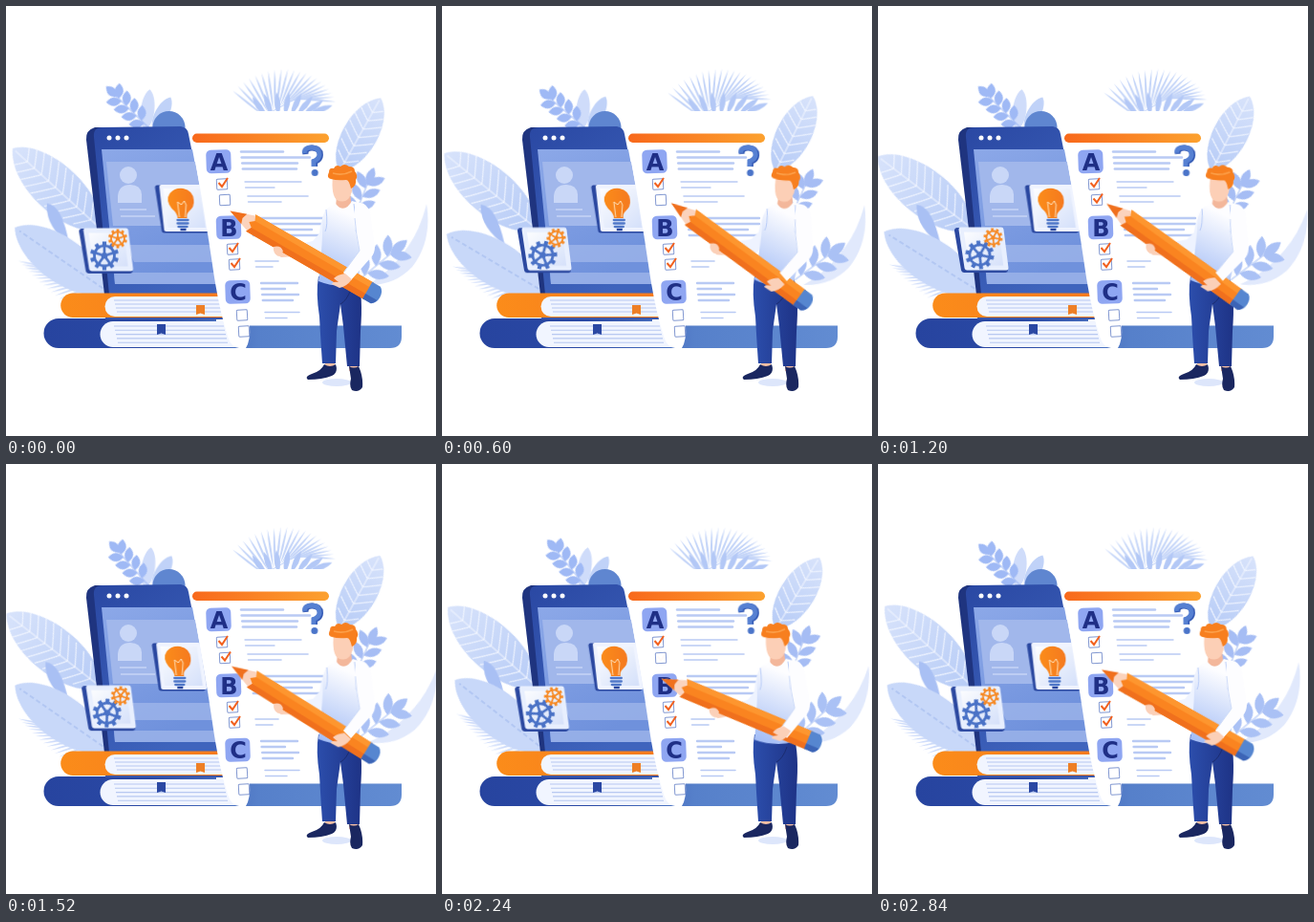
Write an HTML page that moves like this. It is 450x450 px and loops after 2.88 s.

```html
<!DOCTYPE html>
<html lang="en">
<head>
<meta charset="utf-8">
<title>Online test</title>
<style>
html, body { margin: 0; width: 100%; height: 100%; overflow: hidden; background: #fff; }
svg { display: block; width: 100vw; height: 100vh; }
text { font: bold 24px "DejaVu Sans", sans-serif; fill: #1f2f86; text-anchor: middle; }
.sway { animation: sway 1440ms ease-in-out infinite alternate; }
.float { animation: float 1440ms ease-in-out infinite alternate; }
.pencil { transform-origin: 312px 258px; animation: write 2880ms linear infinite; }
.torso { transform-origin: 350px 285px; animation: lean 2880ms linear infinite; }
.tick { animation: tick 2880ms linear infinite; }
.gear { animation: turn 2880ms linear infinite; }
@keyframes sway { from { transform: rotate(var(--a)); } to { transform: rotate(var(--b)); } }
@keyframes float { from { transform: translate(var(--a)); } to { transform: translate(var(--b)); } }
@keyframes turn { to { transform: rotate(72deg); } }
@keyframes write {
  0%, 100% { transform: rotate(0deg); }
  12.5% { transform: rotate(4deg); animation-timing-function: ease-out; }
  30% { transform: rotate(7.6deg); animation-timing-function: ease-in; }
  53% { transform: rotate(2deg); }
  67% { transform: rotate(-7.3deg); animation-timing-function: ease-out; }
  73% { transform: rotate(-7.8deg); animation-timing-function: ease-in; }
  87.5% { transform: rotate(-5deg); }
}
@keyframes lean {
  0%, 100% { transform: rotate(0deg); }
  12.5% { transform: rotate(3.3deg); animation-timing-function: ease-out; }
  30% { transform: rotate(4.6deg); animation-timing-function: ease-in; }
  53% { transform: rotate(.5deg); }
  67%, 87% { transform: rotate(-1.5deg); }
}
@keyframes tick {
  0%, 28% { opacity: 0; }
  33%, 72% { opacity: 1; }
  78%, 100% { opacity: 0; }
}
</style>
</head>
<body>
<svg viewBox="0 0 450 450">
  <defs>
    <linearGradient id="leaf"><stop stop-color="#b6cbf6"/><stop offset="1" stop-color="#d8e3fb"/></linearGradient>
    <linearGradient id="phone" x2=".6" y2="1"><stop stop-color="#2a48a3"/><stop offset="1" stop-color="#3f64bd"/></linearGradient>
    <linearGradient id="screen" x2=".4" y2="1"><stop stop-color="#8ca8e8"/><stop offset="1" stop-color="#6f91dc"/></linearGradient>
    <linearGradient id="card" x2="1" y2="1"><stop stop-color="#fff"/><stop offset="1" stop-color="#d3dffa"/></linearGradient>
    <linearGradient id="orange"><stop stop-color="#fb8c1a"/><stop offset="1" stop-color="#f57a1f"/></linearGradient>
    <linearGradient id="rail"><stop stop-color="#f8691c"/><stop offset="1" stop-color="#fca12f"/></linearGradient>
    <linearGradient id="bar"><stop stop-color="#27449f"/><stop offset=".3" stop-color="#2a49a5"/><stop offset=".6" stop-color="#5680ca"/><stop offset="1" stop-color="#628cd2"/></linearGradient>
    <linearGradient id="shirt" x1=".6" x2=".35" y2="1"><stop offset=".15" stop-color="#fdfdff"/><stop offset="1" stop-color="#a6bff6"/></linearGradient>
    <linearGradient id="trousers" x2="1"><stop stop-color="#2c4eac"/><stop offset="1" stop-color="#1e3386"/></linearGradient>
  </defs>

  <g id="plants"></g>

  <!-- phone -->
  <circle cx="170.500" cy="127" r="17" fill="#5f86d0"/>
  <path d="M84 140Q83 130 93 127H183L190 134L224 302H103Z" fill="#1f347f"/>
  <path d="M92 137Q91 127 101 127L183 126Q190 127 191 134L224 302H108Z" fill="url(#phone)"/>
  <path d="M100 150H195L221 291H114Z" fill="url(#screen)"/>
  <g fill="#fff"><circle cx="108" cy="138" r="2.5"/><circle cx="117" cy="138" r="2.5"/><circle cx="126" cy="138" r="2.5"/></g>
  <path d="M105 163H198L210 230H112Z" fill="#a1b7eb"/>
  <g fill="#c9d7f7">
    <circle cx="128" cy="177" r="9"/>
    <path d="M117 206V199Q118 187 130 187Q141 187 142 197V206Z"/>
    <path d="M119 212H147V214H119ZM120 219H156V221H120Z" opacity=".7"/>
  </g>
  <path d="M126 250H214L217 268H134ZM113 279H219L221 291H114Z" fill="#a1b7eb" opacity=".75"/>

  <!-- books -->
  <path d="M55 327H414V346Q414 358 402 358H55A15.500 15.500 0 0 1 55 327Z" fill="url(#bar)"/>
  <path d="M220 326H416V334.500H220Z" fill="#fff"/>
  <path d="M70 300.500H232V326H70A12.700 12.700 0 0 1 70 300.500Z" fill="url(#orange)"/>
  <path d="M232 304H114A10.500 10.500 0 0 0 114 325H232Z" fill="#f1f5ff"/>
  <path d="M236 330H112A13.500 13.500 0 0 0 112 357H240Z" fill="#f1f5ff"/>
  <g id="pages" stroke="#b7c8f1" stroke-width="1.1"></g>
  <path d="M104 327H232" stroke="#3a56a9" stroke-width="2"/>
  <path d="M199 313H208V323L203.500 321.500L199 323Z" fill="#ee7f25"/>
  <path d="M158 333H167V344L162.500 342.500L158 344Z" fill="#2b48a3"/>

  <!-- idea card, tucked under the sheet -->
  <g class="float" style="--a:-2px,0px;--b:2px,0px;animation-delay:-1080ms" stroke-linejoin="round">
    <path d="M157 190H199L208 235H164Z" fill="#2b48a0" stroke="#2b48a0" stroke-width="5"/>
    <path d="M161 189H203L210 234H166Z" fill="url(#card)" stroke="#f0f4ff" stroke-width="4"/>
    <path d="M178 222Q178 217 172 212Q165 203 170 196Q175 190 184 191Q194 193 195 203Q196 210 190 215Q187 218 188 222Z" fill="url(#orange)"/>
    <path d="M180 221L178 205L182 208L185 204L187 208L186 221" fill="none" stroke="#ffe0b8" stroke-width="1"/>
    <path d="M178 224H189M178 227.500H189M179 231H188" stroke="#4f77c8" stroke-width="2.300" stroke-linecap="round"/>
    <path d="M181 234H187" stroke="#2b48a0" stroke-width="2.500"/>
  </g>

  <!-- sheet -->
  <path d="M191 110H344V334H255Q256 350 251 358H244Q236 358 232 346Q224 320 219 290C213 250 204 190 194 142Z" fill="#fff"/>
  <rect x="195" y="133.500" width="143" height="9.500" rx="4.700" fill="url(#rail)"/>
  <g id="lines" stroke="#b9caf4" stroke-linecap="round"></g>
  <g id="boxes"></g>
  <g class="sway" style="--a:-2deg;--b:2deg;transform-origin:321px 161px;animation-delay:-500ms" fill="none" stroke-width="6">
    <path d="M313.500 155Q313 148 321 148.500Q329 149 329 156Q329 161 323 163V168" stroke="#3157b3"/>
    <path d="M312.500 154Q312 148 320 148Q328 148.500 328 155.500Q328 160 322 162.500V168" stroke="#5680d2" stroke-width="5"/>
    <circle cx="323" cy="174.500" r="3.500" fill="#4a74c9"/>
  </g>

  <!-- gear card -->
  <g class="float" style="--a:0px,0px;--b:4px,-1px;animation-delay:-340ms" stroke-linejoin="round">
    <path d="M79 236H124L129 277H86Z" fill="#2b48a0" stroke="#2b48a0" stroke-width="6"/>
    <path d="M83 235H125L130 275H89Z" fill="url(#card)" stroke="#e8effe" stroke-width="5"/>
    <g id="gears"></g>
  </g>

  <!-- man -->
  <ellipse cx="346" cy="394" rx="15" ry="4" fill="#dde6fb"/>
  <path d="M333 369H344V381H335ZM359 372H369V382H359Z" fill="#f6bfa4"/>
  <path d="M333 375Q339 379 345 375Q348 384 341 387Q331 391 316 391Q312 388 320 385Q330 382 333 375ZM359 377Q364 380 369 377Q374 388 373 399Q369 405 362 402Q359 398 361 390Z" fill="#1a2760"/>
  <path d="M327 283L368 284Q374 303 371 340L370 377H357L353 335L350 312L346 340L345 374H331Q329 345 328 325Q324 300 327 283Z" fill="url(#trousers)"/>
  <path d="M350 312Q357 308 361 296" fill="none" stroke="#1b2c70" stroke-width="1"/>
  <g class="torso">
    <path d="M337 213Q329 222 328 238L321 246L290 253V260L325 262L342 245Z" fill="#eef3ff"/>
    <path d="M346 198L360 195L362 212Q353 219 345 211Z" fill="#f3b79b"/>
    <path d="M345 207Q334 209 331 222Q332 245 327 288Q347 296 368 291Q373 255 381 226Q382 208 362 204Q354 218 345 207Z" fill="url(#shirt)"/>
    <path d="M335 213Q337 230 334 236M364 207Q367 222 366 236" fill="none" stroke="#b8ccf8" stroke-width="1"/>
    <path d="M342 178L360 176Q366 190 359 201Q354 207 346 203Q340 197 342 178Z" fill="#fccfb6"/>
    <path d="M340 181Q335 180 338 174Q338 169 343 170Q345 165 350 168Q354 164 359 168Q365 168 365 173Q369 177 366 182Q367 188 361 191Q359 182 356 182Q346 183 340 181Z" fill="#f77f1f"/>
    <path d="M342 175Q352 178 362 173" fill="none" stroke="#fca04a" stroke-width="1.500"/>
  </g>

  <g class="pencil">
    <path d="M304 262L288 263Q281 260 280 254L284 252L292 255L303 253Z" fill="#fbd0b8"/>
    <g transform="translate(234.500 214.500) rotate(30)">
      <path d="M0 0L29 -10V10Z" fill="#fbd3bd"/>
      <path d="M0 0L17 -6L15 0L17 6Z" fill="#f0701d"/>
      <path d="M25 -10H168V10H25L28 4L23 0L28 -4Z" fill="#fa8420"/>
      <path d="M28 -4L25 -10H168V-4Z" fill="#fd962f"/>
      <path d="M28 4L25 10H168V4Z" fill="#f0701d"/>
      <path d="M166 -10H176Q181 -7 181 0Q181 7 176 10H166Z" fill="#5686d0"/>
      <path d="M166 4V10H176Q179 8 180 4Z" fill="#3c64b6"/>
    </g>
    <path d="M280 252Q288 250 290 257L285 262Q279 259 280 252Z" fill="#fbd0b8"/>
  </g>
  <g class="torso">
    <path d="M366 207Q376 203 381 216Q384 237 386 252Q386 259 382 263L361 287L353 279L370 256Q365 237 364 220Z" fill="#fdfdff"/>
    <path d="M365 222Q366 238 370 256L354 278" fill="none" stroke="#cbd9f8" stroke-width="1"/>
  </g>
  <g class="pencil">
    <path d="M355 280L362 286Q356 294 349 295L341 291Q342 288 348 289L343 285Q347 281 355 280Z" fill="#fbd0b8"/>
  </g>
</svg>
<script>
const byId = id => document.getElementById(id);
const range = n => [...Array(n).keys()];
const place = (x, y, angle, body) => `<g transform="translate(${x} ${y}) rotate(${angle})">${body}</g>`;
const blade = (length, width) => `<path d="M0 0Q${length / 2} ${-width} ${length} 0Q${length / 2} ${width} 0 0Z"/>`;

// Swings a part about (x, y) between angles a and b.
const sway = (x, y, a, b, delay, body) =>
  `<g class="sway" style="--a:${a}deg;--b:${b}deg;transform-origin:${x}px ${y}px;animation-delay:${delay}ms">${body}</g>`;

const leafShape = (length, width, fill) =>
  `<path fill="${fill}" d="M0 0C${length * .15} ${-width * 1.3} ${length * .8} ${-width * 1.4} ${length} 0C${length * .85} ${width * 1.3} ${length * .2} ${width * 1.4} 0 0Z"/>`;

function veinedLeaf(length, width) {
  let veins = `M0 0H${length * .97}`;
  for (let x = length * .12; x < length * .85; x += 10) {
    const reach = width * .95 * Math.sin(Math.PI * Math.min(1, (x + 7) / length)) ** .6;
    veins += `M${x} 0q${reach * .4} ${-reach * .6} ${reach * .7} ${-reach}M${x} 0q${reach * .4} ${reach * .6} ${reach * .7} ${reach}`;
  }
  return leafShape(length, width, 'url(#leaf)') + `<path d="${veins}" fill="none" stroke="#f2f6ff" stroke-width="1.1"/>`;
}

function frond([x0, y0], [x1, y1], a0, a1, count, length, width, fill) {
  const needles = range(count).map(i => {
    const k = i / (count - 1);
    return place(x0 + (x1 - x0) * k, y0 + (y1 - y0) * k, a0 + (a1 - a0) * k, blade(length, width));
  });
  return `<g fill="${fill}"><path d="M${x0} ${y0}L${x1} ${y1}" stroke="${fill}"/>${needles.join('')}</g>`;
}

function branch(length, pairs, size, width, fill) {
  const leaves = range(pairs).map(i => {
    const x = length * (.12 + .7 * i / pairs);
    return place(x, 0, -48, blade(size, width)) + place(x + 4, 0, 48, blade(size, width));
  });
  return `<g fill="${fill}"><path d="M0 0H${length - size / 2}" stroke="${fill}" stroke-width="1.200"/>` +
    leaves.join('') + place(length - size, 0, 0, blade(size, width)) + '</g>';
}

byId('plants').innerHTML = [
  sway(100, 235, .3, -5, -240, place(100, 234, -137.6, veinedLeaf(126, 24))),
  sway(70, 260, 2, -2, -500, '<path d="M66 250Q40 230 42 207Q58 208 66 250Z" fill="#a9c0f4"/>'),
  sway(105, 300, 3, -4, -690, frond([100, 299], [48, 274], 150, 192, 15, 36, 2, '#cddbfa')),
  sway(108, 300, 3, -4.5, -690, place(108, 300, -145, leafShape(120, 23, '#c8d8f9') +
    '<path d="M0 0H114" stroke="#9db6ec" stroke-width="1" stroke-dasharray="5 3"/>')),
  sway(150, 128, -2, 3, -2280, place(146, 130, -84, leafShape(43, 7, '#cfdcfa')) +
    place(154, 130, -62, leafShape(39, 7, '#c0d2f8'))),
  sway(150, 128, -6, 5, -2280, place(150, 128, -133.7, branch(63, 4, 16, 9, '#9fb9f5'))),
  sway(285, 115, -2, 2, -2020, frond([270, 115], [303, 97], -142, 3, 21, 42, 2.200, '#c3d4f8') +
    frond([272, 116], [318, 112], -125, -20, 8, 25, 6, '#b3c8f6')),
  sway(350, 172, 1.5, -4, -640, place(349, 173, -60, veinedLeaf(88, 18))),
  sway(385, 300, 0, 7, -2720, '<path d="M440 207Q446 246 425 273Q406 293 378 292Q403 278 421 251Q433 234 440 207Z" fill="#e1e9fc"/>'),
  sway(372, 285, -3, 3, -640, place(369, 287, -39, branch(66, 3, 23, 10, '#aac1f5'))),
  sway(360, 225, -2, 3, -400, place(364, 222, -67, branch(57, 3, 20, 9, '#a6bdf4')))
].join('');

const stroke = (x, y, end) => `<path d="M${x} ${y}H${end}"/>`;
byId('pages').innerHTML =
  range(4).map(i => stroke(113 + i, 308 + i * 4, 226 + i)).join('') +
  range(5).map(i => stroke(113 + i, 335 + i * 4.3, 228 + i)).join('');

// Each block: line weight, start x, y, then the end of every line.
const blocks = [
  [2.4, 246, 152.5, 290, 318, 305, 304], [1.3, 250, 184, 309, 281], [1.6, 253, 199, 316, 288],
  [2.4, 257, 222, 332, 332, 320, 330], [1.6, 261, 267, 285, 279],
  [2.4, 267, 290, 305, 292, 306, 300], [1.5, 271, 320.5, 307, 294]
];
byId('lines').innerHTML = blocks.map(([weight, x, y, ...ends]) =>
  `<g stroke-width="${weight}">${ends.map((end, i) => stroke(x + i * .6, y + i * 6, end)).join('')}</g>`).join('');

const label = (letter, x, y) =>
  `<rect x="${x - 13}" y="${y - 12}" width="26" height="24.500" rx="5" transform="rotate(-2 ${x} ${y})" fill="#8fa6f2"/>` +
  `<text x="${x + .5}" y="${y + 9}">${letter}</text>`;
const box = (x, y, tick) =>
  `<rect x="${x}" y="${y}" width="11" height="11" rx="1" transform="rotate(-3 ${x + 5} ${y + 5})" fill="#fff" stroke="#8298d1"/>` +
  (tick ? `<path class="${tick}" d="M${x + 2} ${y + 4}l3.500 4l6 -9" fill="none" stroke="#f2611f" stroke-width="2"/>` : '');
byId('boxes').innerHTML =
  label('A', 222.5, 162.5) + label('B', 233, 231.5) + label('C', 242.5, 299) +
  box(220.5, 181, 'done') + box(223.5, 197.5, 'tick') + box(231.5, 249, 'done') +
  box(233.5, 265, 'done') + box(241.5, 318, '') + box(243.5, 335, '');

function gear(x, y, radius, teeth, color) {
  const cogs = range(teeth).map(i =>
    `<rect x="${-radius * .14}" y="${-radius}" width="${radius * .28}" height="${radius * .35}" transform="rotate(${i * 360 / teeth})"/>`);
  const spokes = range(5).map(i => `<path d="M0 0V${-radius * .66}" transform="rotate(${i * 72})"/>`);
  return place(x, y, 0, `<g class="gear" fill="${color}">${cogs.join('')}
    <g stroke="${color}" stroke-width="${radius * .18}"><circle r="${radius * .7}" fill="none"/>${spokes.join('')}</g>
    <circle r="${radius * .22}"/></g>`);
}
byId('gears').innerHTML = gear(102.5, 261.5, 15, 10, '#4a72c6') + gear(116.5, 243.5, 10, 10, '#f68a25');
</script>
</body>
</html>
```
